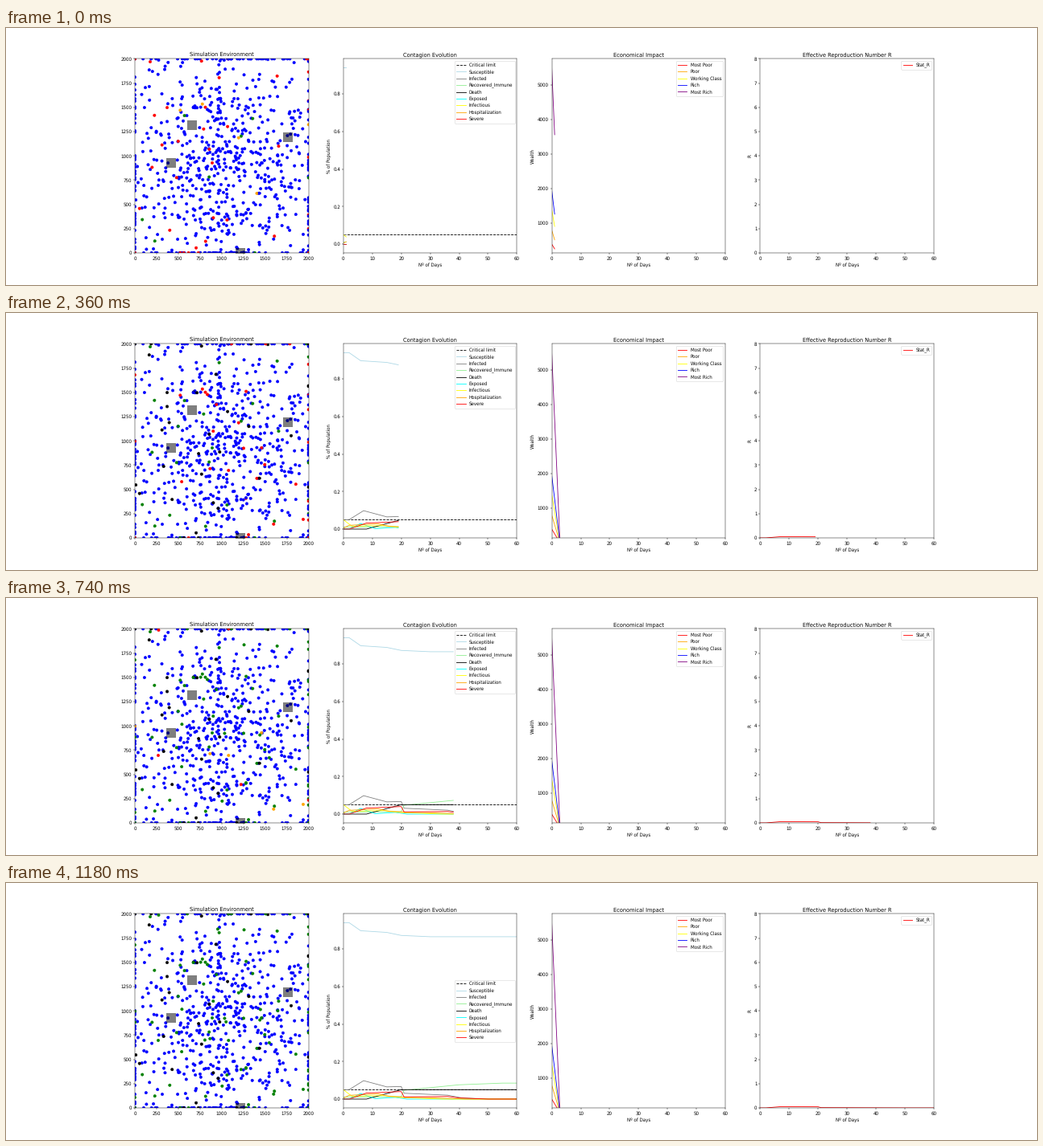
A matplotlib script for the animation above (1.2 s loop, 1280x320 px).

```python
import numpy as np
import matplotlib.pyplot as plt
from matplotlib.animation import FuncAnimation

DAYS = 60
SIZE = 2000
PEOPLE = 800

plt.rcParams.update({
    "font.family": "DejaVu Sans",
    "font.size": 10,
    "text.hinting": "none",
    "figure.subplot.bottom": 0.125,
    "legend.labelspacing": 0.46,
})

# Courses of illness: number of people, then (colour, earliest day, latest day).
COURSES = [
    (8, ("green", 0, 0)),
    (26, ("red", 0, 0), ("green", 14, 22)),
    (5, ("orange", 0, 0), ("red", 8, 11), ("green", 20, 23)),
    (13, ("red", 0, 0), ("black", 9, 18)),
    (22, ("orange", 3, 10), ("black", 12, 19)),
    (16, ("red", 5, 16), ("green", 20, 24)),
    (8, ("red", 10, 17), ("orange", 28, 36), ("green", 36, 50)),
    (5, ("red", 20, 36), ("green", 40, 54)),
    (18, ("green", 20, 50)),
]
HOSPITALS = [(655, 1320), (1765, 1190), (415, 925), (1215, 0)]

# Key points (day, share); each curve is flat before the first and after the last.
HEALTH = [
    ("Susceptible", "lightblue",
     [(2, .94), (6, .897), (15, .888), (20, .872), (30, .865)]),
    ("Infected", "gray",
     [(2, .05), (7, .098), (15, .065), (20, .067), (21, .031), (36, .021), (41, .006), (51, 0)]),
    ("Recovered_Immune", "lightgreen",
     [(0, .01), (20, .013), (21, .047), (40, .076), (55, .085)]),
    ("Death", "black", [(8, 0), (20, .05)]),
    ("Exposed", "cyan", [(2, 0), (6, .03), (11, .002), (18, .009), (22, 0)]),
    ("Infectious", "yellow", [(0, .05), (3, .015), (14, .019), (20, .008), (34, 0)]),
    ("Hospitalization", "orange",
     [(0, .005), (2, .02), (12, .028), (16, .014), (32, .006), (42, 0)]),
    ("Severe", "red",
     [(2, 0), (8, .032), (20, .04), (21, .011), (36, .014), (40, .006), (50, 0)]),
]
REPRODUCTION = [(2, 0), (7, .05), (20, .045), (21, .01), (50, 0)]
WEALTH = [
    ("Most Poor", "red", 395),
    ("Poor", "orange", 800),
    ("Working Class", "yellow", 1400),
    ("Rich", "blue", 1950),
    ("Most Rich", "purple", 5503),
]
DAILY_LOSS = 0.353

days = np.arange(DAYS + 1)


def curve(points):
    return np.interp(days, *zip(*points))


def make_people():
    """Places of all people, and a timeline of (day, colour) for each."""
    rng = np.random.default_rng(7)
    places = np.clip(rng.normal(SIZE / 2, SIZE / 3, (PEOPLE, 2)), 0, SIZE)
    plans = []
    for count, *steps in COURSES:
        for _ in range(count):
            plans.append([(0, "blue")] + [(rng.integers(first, last + 1), colour)
                                          for colour, first, last in steps])
    healthy = [[(0, "blue")]] * (PEOPLE - len(plans))
    return places, healthy + plans


def colours_on(day):
    return [[colour for start, colour in plan if start <= day][-1] for plan in plans]


fig, (world, health, money, spread) = plt.subplots(1, 4, figsize=(32, 8), dpi=40)

places, plans = make_people()
people = world.scatter(*places.T, c=colours_on(1))
world.scatter(*zip(*HOSPITALS), s=506, marker="s", color="black", alpha=0.5, linewidths=0)
world.set(title="Simulation Environment", xlim=(0, SIZE), ylim=(0, SIZE))
world.set_xticks(range(0, SIZE + 1, 250))
world.set_yticks(range(0, SIZE + 1, 250))

tracks = []


def add_track(ax, label, colour, values):
    line, = ax.plot([], [], color=colour, label=label)
    tracks.append((line, values))


health.axhline(0.05, color="black", ls="--", label="Critical limit")
for label, colour, points in HEALTH:
    add_track(health, label, colour, curve(points))
for label, colour, start in WEALTH:
    add_track(money, label, colour, start * (1 - DAILY_LOSS * days))
add_track(spread, "Stat_R", "red", curve(REPRODUCTION))

health.set(title="Contagion Evolution", ylabel="% of Population", ylim=(-0.047, 0.987))
health.set_yticks([0, 0.2, 0.4, 0.6, 0.8])
money.set(title="Economical Impact", ylabel="Wealth", ylim=(140, 5758))
money.set_yticks(range(1000, 5001, 1000))
spread.set(title="Effective Reproduction Number R", ylabel="R", ylim=(0, 8))
for ax in (health, money, spread):
    ax.set(xlabel="Nº of Days", xlim=(0, DAYS))
    ax.set_xticks(range(0, DAYS + 1, 10))
    ax.legend(loc="upper right")
key = health.get_legend()


def update(frame):
    day = frame + 1
    people.set_facecolor(colours_on(day))
    for line, values in tracks:
        line.set_data(days[:day + 1], values[:day + 1])
    # The legend steps aside once the top curve reaches it.
    key.set_loc("upper right" if day < 39 else "center right")
    return [people, key] + [line for line, _ in tracks]


anim = FuncAnimation(fig, update, frames=DAYS, init_func=lambda: update(0),
                     interval=20, repeat=True, repeat_delay=0)
plt.show()
```
